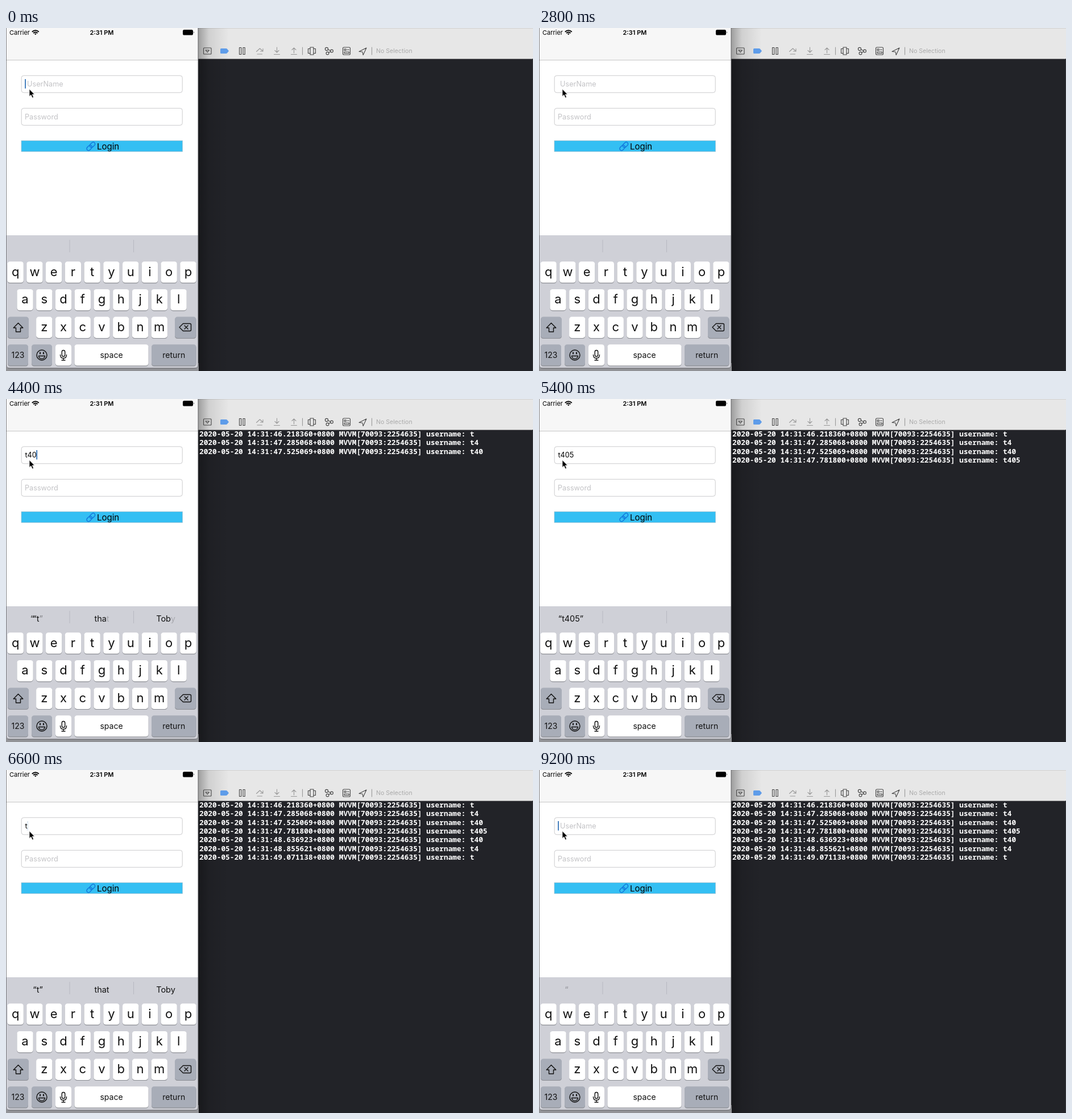
An HTML page that plays this animation: 927x604 px, repeating every 9.6 s.

```html
<!DOCTYPE html>
<html lang="en">
<head>
<meta charset="utf-8">
<title>Login form with console</title>
<style>
  html, body { margin: 0; width: 100%; height: 100%; overflow: hidden; background: #222328; }
  svg { display: block; width: 927px; height: 604px; font-family: Inter, Roboto, sans-serif; }
  .mid { text-anchor: middle; }
  .hint { font-size: 14.5px; fill: #111; }
  .ghost { font-size: 12.7px; fill: #c3c3c6; }
  .line { fill: none; stroke: #444; stroke-width: 1.1; stroke-linejoin: round; stroke-linecap: round; }
  .dim { stroke: #999; }
  .glyph { fill: none; stroke: #111; stroke-width: 1.4; stroke-linejoin: round; stroke-linecap: round; }
  #log { font: 700 12.8px "Noto Sans Mono", "DejaVu Sans Mono", monospace; fill: #fff; white-space: pre; }
</style>
</head>
<body>
<svg viewBox="0 0 927 604">
  <defs>
    <linearGradient id="shade">
      <stop offset="0" stop-opacity=".32"/>
      <stop offset=".35" stop-opacity=".1"/>
      <stop offset="1" stop-opacity="0"/>
    </linearGradient>
  </defs>

  <!-- debugger -->
  <rect width="927" height="604" fill="#222328"/>
  <rect x="338" width="589" height="54" fill="#e7e7e7"/>
  <path d="M338 .5H927" stroke="#d2d2d2"/>
  <path d="M338 54.5H927" stroke="#b9b9b9" stroke-width=".6"/>
  <rect x="338" width="54" height="604" fill="url(#shade)"/>
  <path d="M926.5 54V604" stroke="#3a3b40"/>
  <g class="line">
    <rect x="347.5" y="35" width="13.5" height="11" rx="1"/>
    <path d="M351 39h6.5l-3.2 3.6z"/>
    <rect x="410.5" y="34.5" width="3.2" height="12"/>
    <rect x="417" y="34.5" width="3.2" height="12"/>
    <g class="dim">
      <path d="M440.500 41.500l6-5.500 5.500 5M452 36.500v4.500h-4.500M442 46h8.500"/>
      <path d="M476.500 34v9M473 39.500l3.500 3.500 3.500-3.500M471.500 46.500h10"/>
      <path d="M506.500 44v-9M503 38.500l3.500-3.500 3.500 3.500M501.500 46.500h10"/>
      <path d="M521.500 34v13M643.500 34v13"/>
    </g>
    <rect x="535" y="34" width="6" height="13"/>
    <path d="M535 36.500h-3.500v8h3.500M541 36.500h3.500v8h-3.500"/>
    <circle cx="564" cy="37" r="2.600"/><circle cx="573" cy="40.500" r="2.400"/><circle cx="565.500" cy="44.500" r="2.400"/>
    <path d="M566.500 38l4.200 1.700M567.500 43.300l3.500-1.700"/>
    <rect x="592.500" y="34" width="13" height="13" rx="2"/>
    <path d="M595 37h3v2.500h-3zM600 38.300h3.500M595 42h8.500v2.500H595z"/>
    <path d="M621 41.500l13-6.500-5.800 12.500-1.200-5.500z"/>
  </g>
  <path d="M378.500 36h8.500q1.500 0 2.300 1.200l2.700 3.300-2.700 3.300q-.8 1.200-2.300 1.200h-8.500q-1.500 0-1.500-1.500v-6q0-1.500 1.500-1.500z" fill="#5e9ce9"/>
  <text x="651" y="44.300" font-size="10.600" fill="#aaa">No Selection</text>
  <g id="log"></g>

  <!-- phone -->
  <rect y="590" width="339" height="14" fill="#929397"/>
  <path d="M0 0H338V593q0 6-6 6H6q-6 0-6-6z" fill="#fff"/>
  <rect width="338" height="57" fill="#f7f7f7"/>
  <path d="M0 56.500H338" stroke="#c6c6c6"/>
  <path d="M0 365H338V593q0 6-6 6H6q-6 0-6-6z" fill="#cfd0d7"/>
  <path d="M.3 0V593q0 6 6 6H332q6 0 6-6V0" fill="none" stroke="#55565a" stroke-width=".9"/>
  <text x="6" y="12" font-size="11">Carrier</text>
  <g fill="none" stroke="#000" stroke-width="1.900">
    <path d="M45.800 6.700q6-5 12 0M48 9q3.800-3.200 7.600 0"/>
    <path d="M50 10.300q1.800-1.600 3.600 0l-1.800 2z" fill="#000" stroke="none"/>
  </g>
  <text class="mid" x="168.500" y="12" font-size="11" font-weight="600">2:31 PM</text>
  <rect x="311" y="3" width="18" height="9.500" rx="2.600"/>
  <path d="M330 6q1.600 1.700 0 3.600z"/>

  <g fill="#fff" stroke="#cbcbcd">
    <rect x="27.200" y="83.800" width="283" height="30" rx="4"/>
    <rect x="27.200" y="141.300" width="283" height="30" rx="4"/>
  </g>
  <text id="ghost" class="ghost" x="37" y="103">UserName</text>
  <text class="ghost" x="33" y="160.500">Password</text>
  <text id="entry" x="33.500" y="103" font-size="12.700"></text>
  <rect id="caret" y="90" width="1.700" height="16.500" fill="#2a6db5"/>
  <rect x="27" y="198.300" width="283.400" height="19.400" fill="#34bff3" stroke="#9dbccb" stroke-width=".7"/>
  <g transform="translate(149.300 208.300) rotate(-45)" fill="none" stroke="#1479dc" stroke-width="1.500">
    <rect x="-9" y="-3.200" width="10.500" height="6.400" rx="3.200"/>
    <rect x="-1.500" y="-3.200" width="10.500" height="6.400" rx="3.200"/>
  </g>
  <text x="160" y="214" font-size="15">Login</text>
  <path d="M41 107.500v13l3-2.800 2.200 5.300 2.300-1-2.200-5.100h4z" stroke="#fff" stroke-width=".8"/>

  <!-- keyboard -->
  <path d="M112 373v22M224.500 373v22" stroke="#b7b9c1"/>
  <g id="hints"></g>
  <g id="keys"></g>
  <g class="glyph">
    <path d="M21.500 519.500l8.300 8.500h-4.300v7h-8v-7h-4.300z"/>
    <path d="M311.500 520.500h12q2 0 2 2v9q0 2-2 2h-12l-6.500-6.500zM314 524l6 6M320 524l-6 6"/>
    <circle cx="63" cy="576" r="9"/>
    <path d="M57.500 577.500h11q-.8 5-5.500 5t-5.500-5z"/>
    <path d="M60 571.500v2M66 571.500v2" stroke-width="2"/>
    <rect x="98.300" y="567.500" width="5.400" height="11" rx="2.700"/>
    <path d="M95.500 575.500q0 6 5.500 6t5.500-6M101 581.500v3.500M98 585h6"/>
  </g>
</svg>
<script>
const LOOP = 9600, STEP = 200;
const $ = id => document.getElementById(id);
const clamp = v => Math.max(0, Math.min(1, v));

// Field content after each keystroke
const strokes = [
  [-240, ''], [3200, 't'], [4200, 't4'], [4400, 't40'], [4600, 't405'],
  [5600, 't40'], [5800, 't4'], [6000, 't'], [7000, ''],
  [7600, '2'], [8000, '22'], [8800, '2'], [9000, '']
];
const stamps = ['46.218360', '47.285068', '47.525069', '47.781800', '48.636923', '48.855621', '49.071138'];

function drawKeys() {
  let out = '';
  const key = (x, y, w, label, size, dark) => {
    out += `<rect x="${x}" y="${y + 1.2}" width="${w}" height="37.3" rx="4.5" fill="#8b8d93"/>
      <rect x="${x}" y="${y}" width="${w}" height="37.3" rx="4.5" fill="${dark ? '#a8adb8' : '#fff'}"/>
      <text class="mid" x="${x + w / 2}" y="${y + (size > 20 ? 25.3 : 23.3)}" font-size="${size}" fill="#111">${label}</text>`;
  };
  ['qwertyuiop', 'asdfghjkl', 'zxcvbnm'].forEach((row, r) =>
    [...row].forEach((c, i) => key([2.5, 19.4, 53.1][r] + i * 33.75, 411.2 + r * 48.7, 28.3, c, 22)));
  key(3, 508.6, 37, '', 14, true);
  key(297, 508.6, 37.5, '', 14, true);
  const y = 557.3;
  key(3, y, 36, '123', 14, true);
  key(45, y, 36, '', 14, true);
  key(87, y, 28, '', 14);
  key(120.5, y, 130, 'space', 14);
  key(256, y, 78.5, 'return', 14, true);
  $('keys').innerHTML = out;
}

const hintsFor = s => [s && `“${s}”`, s === 't' ? 'that' : '', s === 't' ? 'Toby' : ''];

// Letters appear from the left and vanish from the right
const hintText = (s, slot, amount) => s && `<text class="mid hint" x="${56 + slot * 112.5}" y="392">` +
  [...s].map((c, i) => `<tspan fill-opacity="${clamp(amount * s.length - i)}">${c}</tspan>`).join('') + '</text>';

function drawHints(t) {
  const begin = ([at, s]) => at + (s ? 150 : -25);
  const n = strokes.findLastIndex(k => begin(k) <= t);
  const p = n ? clamp((t - begin(strokes[n])) / 250) : 1;
  const now = hintsFor(strokes[n][1]);
  const old = hintsFor(n ? strokes[n - 1][1] : '');
  $('hints').innerHTML = now.map((s, i) => s === old[i]
    ? hintText(s, i, 1)
    : hintText(old[i], i, 1 - p) + hintText(s, i, p)).join('');
}

function caretAlpha(age) {
  const a = age % 1200;
  return a < 640 ? clamp((640 - a) / 220) : clamp((a - 960) / 160);
}

function draw(t) {
  const n = strokes.findLastIndex(k => k[0] <= t);
  const [at, text] = strokes[n];
  $('entry').textContent = text;
  $('ghost').style.display = text ? 'none' : '';
  $('caret').setAttribute('x', 33.2 + (text ? $('entry').getComputedTextLength() : 0));
  $('caret').setAttribute('opacity', caretAlpha(t - at));
  $('log').innerHTML = stamps.slice(0, n).map((s, i) =>
    `<text x="340" y="${66 + i * 15.3}">2020-05-20 14:31:${s}+0800 MVVM[70093:2254635] username: ${strokes[i + 1][1]}</text>`).join('');
  drawHints(t);
}

let last = -1;
const start = performance.now();
function tick() {
  const t = Math.floor((performance.now() - start) % LOOP / STEP) * STEP;
  if (t !== last) draw(last = t);
  requestAnimationFrame(tick);
}
drawKeys();
tick();
</script>
</body>
</html>
```
